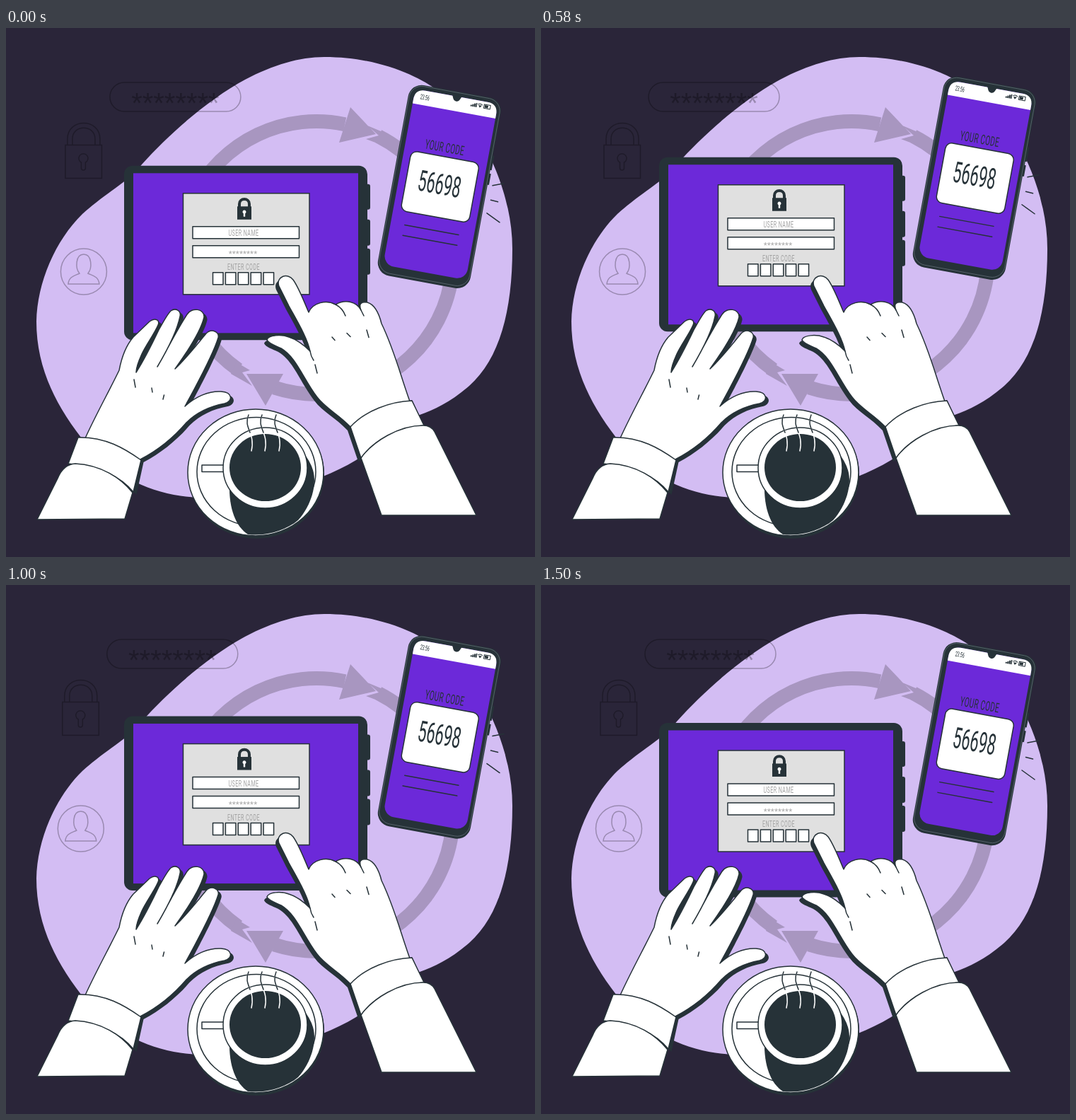
An HTML page for the animation above (1540 ms loop, 748 px wide and 748 px high).

```html
<!DOCTYPE html>
<html lang="en">
<head>
<meta charset="utf-8">
<title>Two-step sign in</title>
<style>
  html, body { margin: 0; height: 100%; overflow: hidden; background: #2a2539; }
  svg { display: block; width: 100vw; height: 100vh; }
  text { font-family: Roboto, "Liberation Sans", sans-serif; text-anchor: middle; }
  .stars { font-family: "Liberation Sans", sans-serif; }
  .narrow text { transform: scaleX(.53); }
  .line { fill: none; stroke: #263238; stroke-width: 1.5; stroke-linecap: round; stroke-linejoin: round; }
  .paper { fill: #fff; stroke: #263238; stroke-width: 1.5; stroke-linejoin: round; }
  .dark { fill: #263238; }
  .purple { fill: #6c29d9; }
  .hint { fill: #a3a3a3; }
  .ghost { fill: none; stroke: #000; stroke-width: 1.5; opacity: .27; }
</style>
</head>
<body>
<svg viewBox="0 0 748 748">
  <defs>
    <path id="leftHand" d="M112 580C128 545 145 515 160 484C163 468 168 451 180 437L203 415C211 409 218 413 215 420C210 432 198 448 192 461C187 472 184 480 184 487C193 473 206 448 216 427C222 416 228 405 233 400C240 395 248 400 246 408C242 428 230 452 214 479C226 459 239 431 256 405C263 394 281 397 280 409C276 427 257 457 239 482C254 468 268 450 283 432C291 424 302 430 300 438C295 455 275 495 253 535C268 521 287 513 304 514C321 515 321 528 309 531C288 535 270 543 255 558C238 578 215 597 190 610L180 656C163 637 140 622 100 617L102 579Z"/>
    <path id="rightHand" d="M487 564C470 546 452 538 440 522C420 496 411 466 389 453C381 449 371 446 369 441C371 434 389 433 400 437C413 441 422 449 430 457C426 438 412 415 400 393L386 365C381 352 398 345 406 356C414 367 421 386 428 402C434 388 453 384 466 391C480 383 496 387 502 399C498 389 503 387 511 388C521 391 527 402 531 418C549 455 558 492 571 528L574 527L590 562L502 608Z"/>
  </defs>

  <rect width="748" height="748" fill="#2a2539"/>
  <path fill="#d3bdf3" d="M450 41C530 41 585 70 610 88C662 122 716 220 716 312C716 400 698 468 655 506C630 528 605 540 585 547C545 562 520 595 495 611C430 650 350 666 270 664C215 661 160 640 115 590C70 535 43 480 43 415C44 360 70 300 108 263C145 230 170 220 192 193C232 148 288 100 338 73C378 52 415 41 450 41Z"/>

  <g fill="#a896c0">
    <circle cx="439" cy="325" r="193" fill="none" stroke="#a896c0" stroke-width="20"
      pathLength="360" stroke-dasharray="171 17 157 15" transform="rotate(-63 439 325)"/>
    <path d="M487 112L523 150L471 162ZM511 138L535 148L525 163L509 157L527 152ZM340 489L392 489L367 534ZM345 484L325 472L318 489L348 506L334 487Z"/>
  </g>

  <g id="icons">
    <g class="ghost">
      <rect x="147" y="77" width="185" height="41" rx="20.5"/>
      <text class="stars" x="239.5" y="120" font-size="40" fill="#000" stroke="none">********</text>
      <rect x="84" y="165.500" width="51.500" height="47"/>
      <path d="M87 165V157C87 127 133 127 133 157V165M94 165V157C94 136 126 136 126 157V165M106.500 190A6.500 6.500 0 1 1 112.500 190V198A3 3 0 0 1 106.500 198Z"/>
      <circle cx="110" cy="344.5" r="32.500"/>
      <path d="M88 362C89 351 98 350 104 347C98 340 98 320 110 320C122 320 122 340 116 347C122 350 131 351 132 362Z"/>
    </g>
  </g>

  <g id="tablet">
    <path class="dark" d="M505 221H512Q515 221 515 224V254Q515 257 512 257H505ZM505 271H512Q515 271 515 274V305Q515 308 512 308H505ZM505 312H512Q515 312 515 315V346Q515 349 512 349H505Z"/>
    <rect class="dark" x="167" y="195" width="344" height="246.500" rx="12"/>
    <rect class="purple" x="180" y="205.500" width="318" height="226"/>
    <rect x="250.500" y="234" width="178.500" height="143" fill="#e0e0e0" stroke="#263238" stroke-width="1.5"/>
    <path fill="none" stroke="#263238" stroke-width="4" d="M330 254V249C330 240 344 240 344 249V254"/>
    <rect class="dark" x="327" y="252.500" width="20" height="18.500"/>
    <path fill="#fff" d="M335.800 262.500A2.500 2.500 0 1 1 338.200 262.500V267H335.800Z"/>
    <rect class="paper" x="264" y="281" width="150.500" height="17"/>
    <rect class="paper" x="264" y="308" width="150.500" height="17"/>
    <g class="narrow hint" transform="translate(336 0)" font-size="13.500" letter-spacing=".8">
      <text y="294">USER NAME</text>
      <text y="342.500">ENTER CODE</text>
    </g>
    <text class="stars hint" x="335" y="324.500" font-size="13">********</text>
    <g id="codeBoxes" class="paper"></g>
  </g>

  <g id="phone">
    <g transform="translate(612.300 224.500) rotate(10.4)">
      <path class="dark" d="M64 -57H69V-36H64ZM64 -31H69V-15H64Z"/>
      <rect class="dark" x="-66" y="-137" width="133" height="274" rx="19"/>
      <rect x="-64.500" y="-135.500" width="130" height="269" rx="18" fill="none" stroke="#657078" stroke-width=".7"/>
      <rect class="purple" x="-58" y="-130" width="119" height="253" rx="15"/>
      <path fill="#fff" d="M-58 -109V-115Q-58 -130 -43 -130H46Q61 -130 61 -115V-109Z"/>
      <path class="dark" d="M-6 -131C-3 -131 -4 -123 2 -123C8 -123 7 -131 10 -131Z"/>
      <path class="dark" d="M23 -120V-122H25V-120ZM25.500 -120V-123.500H27.500V-120ZM28 -120V-125H30V-120ZM30.500 -120V-126H32V-120ZM36.500 -120L34 -123.500H39Z"/>
      <path class="line" style="stroke-width:1" d="M33.500 -124.500Q36.500 -127 39.500 -124.500M42 -126H51V-120.500H42Z"/>
      <rect class="dark" x="43" y="-125" width="5" height="3.500"/>
      <rect class="paper" x="-47.500" y="-43" width="98" height="86" rx="9"/>
      <path class="line" d="M-38 62H39.500M-38 77H40"/>
      <g class="narrow dark">
        <g transform="translate(-42.500 -117)"><text font-size="10">23:56</text></g>
        <g transform="translate(-2 -49.500)"><text font-size="18.700" letter-spacing=".6">YOUR CODE</text></g>
        <g transform="translate(0 10.500)"><text font-size="41">56698</text></g>
      </g>
    </g>
    <path class="line" d="M688 223L704 220M685.500 243.500L695.500 246M680 262L698 275"/>
  </g>

  <use href="#leftHand" class="dark" x="4.500" y="4"/>
  <use href="#leftHand" class="paper"/>
  <path class="paper" d="M102 579C140 578 167 594 191 611L180 656C163 636 137 620 88 616Z"/>
  <path class="paper" d="M44 695L73 637Q81 617 98 616C135 618 162 636 179 657L168 694Z"/>
  <path class="line" d="M181 497L183 508M206 509L207 515M223.500 519L222 525"/>

  <use href="#rightHand" class="dark" x="-4" y="5"/>
  <use href="#rightHand" class="paper"/>
  <path class="paper" d="M487 564C508 541 544 528 574 527L591 562C556 564 519 584 502 608Z"/>
  <path class="paper" d="M502 608C519 584 556 562 590 562Q601 562 606 571L665 689H531Z"/>
  <path class="line" d="M466 391Q476 396 480 407M502 399L506 407M461 437L465 441.500M482 431.500L487 436.500M510 427L513 437.500M430 457Q431 464 435 470M437 476L440 488"/>

  <ellipse class="dark" cx="354" cy="631" rx="96" ry="91"/>
  <ellipse class="paper" cx="353" cy="628.500" rx="96" ry="89.500"/>
  <ellipse class="paper" cx="354" cy="627.500" rx="84" ry="77"/>
  <path class="dark" d="M316 645C315 680 325 705 342 716C370 719 396 710 413 696C432 675 440 645 434 625Q430 612 420 600Z"/>
  <rect class="paper" x="277" y="618" width="34" height="9.500"/>
  <ellipse class="paper" cx="366.500" cy="622" rx="59.500" ry="57"/>
  <ellipse class="dark" cx="366.500" cy="621.500" rx="50.500" ry="47.500"/>
  <g id="steam"></g>
</svg>
<script>
  const byId = id => document.getElementById(id);
  const FPS = 24, LOOP = 1540, CYCLE = 1500, RISE = 15;
  const SHAKE = [0, -1, 2, -4, 4, -4, 4, -4, 2, -1, 0].map(x => x * 1.5);

  byId('codeBoxes').innerHTML = [0, 1, 2, 3, 4].map(i =>
    `<rect x="${292.5 + i * 17.9}" y="346" width="14.5" height="17"/>`).join('');

  // Steam is dark above the cup and white over the coffee.
  byId('steam').innerHTML = [343, 362, 382].map(x => {
    const d = `M${x} 547C${x - 8} 566 ${x + 10} 572 ${x + 4} 598`;
    return `<path class="line" style="stroke:#fff" d="${d}"/>` +
      `<path class="line" stroke-dasharray="26 99" d="${d}"/>`;
  }).join('');

  const shift = (id, x, y) => byId(id).setAttribute('transform', `translate(${x} ${y})`);

  function shakeAt(p) {
    const pos = p * (SHAKE.length - 1);
    const i = Math.min(Math.floor(pos), SHAKE.length - 2);
    return SHAKE[i] + (SHAKE[i + 1] - SHAKE[i]) * (pos - i);
  }

  function draw(ms) {
    const step = Math.floor((ms % LOOP + 5) * FPS / 1000) * 1000 / FPS;
    const time = Math.min(CYCLE, step + 10 + 20 * Math.sin(Math.PI * step / LOOP));
    const p = time / CYCLE;
    const lift = -RISE * (1 - Math.abs(2 * p - 1));
    shift('tablet', 0, lift);
    shift('phone', 0, lift);
    shift('icons', shakeAt(p), 0);
  }

  const start = performance.now();
  function tick() {
    draw(performance.now() - start);
    requestAnimationFrame(tick);
  }
  tick();
</script>
</body>
</html>
```
